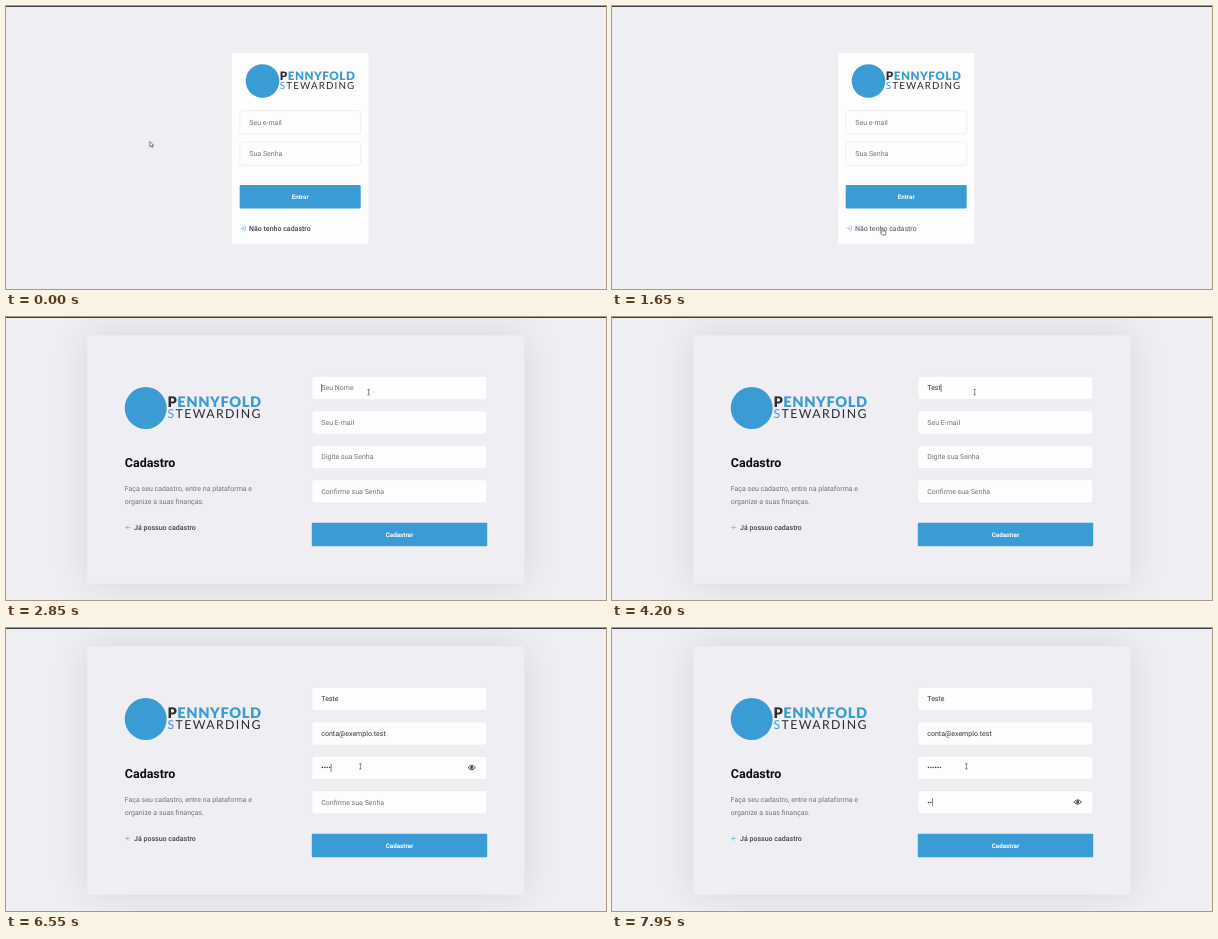
These frames come from a looping animation (600x283 px, 8000 ms). An HTML page:

```html
<!DOCTYPE html>
<html lang="pt-BR">
<head>
<meta charset="utf-8">
<title>Cadastro</title>
<style>
  html, body { margin: 0; width: 100%; height: 100%; overflow: hidden; background: #efeef3; }
  svg { display: block; width: 100vw; height: 100vh; }
  text { font: 400 7.02px Roboto, sans-serif; fill: #333; text-rendering: geometricPrecision; white-space: pre; }
  .hint { fill: #757575; }
  .note { fill: #737380; }
  .link { font-weight: 500; fill: #41414d; }
  .title { font-size: 12.48px; font-weight: 700; fill: #0c0c10; }
  .label { font-size: 6.25px; font-weight: 700; fill: #fff; text-anchor: middle; }
  .top { font: 900 14.6px Lato, sans-serif; letter-spacing: .6px; }
  .sub { font: 400 12.3px Lato, sans-serif; letter-spacing: 1.4px; }
  .blue { fill: #3a9bd5; }
  .dark { fill: #2b2b30; }
  .field { fill: #fdfdfe; stroke: #e0e0e8; stroke-width: .5; }
  .icon { fill: none; stroke: #3a9bd5; stroke-width: 2; stroke-linecap: round; stroke-linejoin: round; }
  .shadow { fill: #000; opacity: .1; filter: blur(19.5px); }
  .pointer { fill: #fff; stroke: #333; stroke-width: .6; stroke-linejoin: round; }
</style>
</head>
<body>
<svg viewBox="0 0 600 283" preserveAspectRatio="none">
  <defs>
    <g id="logo">
      <circle r="21" class="blue"/>
      <text x="21.7" y="-.8" class="top blue"><tspan class="dark">P</tspan>ENNYFOLD</text>
      <text x="21.7" y="9.8" class="sub dark"><tspan class="blue">S</tspan>TEWARDING</text>
    </g>
  </defs>
  <rect width="600" height="283" fill="#efeef3"/>

  <g id="login">
    <rect x="226" y="47" width="136.5" height="191" fill="#fdfdfe"/>
    <use href="#logo" transform="translate(256.5 75) scale(.8)"/>
    <g id="loginFields"></g>
    <rect x="233.7" y="179" width="121" height="23.4" rx="1" class="blue"/>
    <text x="294.2" y="193" class="label">Entrar</text>
    <g id="signup">
      <path class="icon" transform="translate(233.9 219.2) scale(.26)"
        d="M15 3h4a2 2 0 0 1 2 2v14a2 2 0 0 1-2 2h-4M10 17l5-5-5-5M15 12H3"/>
      <text x="243" y="224.7" class="link">Não tenho cadastro</text>
    </g>
  </g>

  <g id="register">
    <rect x="81.3" y="18.3" width="437.2" height="248.5" rx="3.1" class="shadow"/>
    <rect x="81.3" y="18.3" width="437.2" height="248.5" rx="3.1" fill="#efeef3"/>
    <use href="#logo" transform="translate(139.7 91)"/>
    <text x="118.8" y="150" class="title">Cadastro</text>
    <text x="118.8" y="174" class="note">Faça seu cadastro, entre na plataforma e</text>
    <text x="118.8" y="186.5" class="note">organize a suas finanças.</text>
    <path class="icon" transform="translate(118.8 207.4) scale(.26)" d="M19 12H5M12 19l-7-7 7-7"/>
    <text x="128" y="213" class="link">Já possuo cadastro</text>
    <g id="registerFields"></g>
    <rect x="305.8" y="205.8" width="175.4" height="23.4" rx="1" class="blue"/>
    <text x="393.5" y="219.7" class="label">Cadastrar</text>
    <g id="eye" fill="none" stroke="#333" stroke-width=".9">
      <path d="M-3.6 0Q0-4.4 3.6 0Q0 4.4-3.6 0Z"/>
      <circle r="1" fill="#333"/>
    </g>
    <rect id="caret" width=".6" height="8" fill="#333"/>
  </g>

  <rect width="600" height="1" fill="#3e3e44"/>

  <g id="mouse">
    <path id="arrow" class="pointer" d="M0 0V5.3L1.3 4.2L2.2 6.1L3.1 5.7L2.2 3.9H3.8Z"/>
    <path id="hand" class="pointer"
      d="M-.6 .6Q0-.3 .6 .6V2.8L3 3.3Q3.7 3.6 3.5 4.5L2.9 7H-.5L-2.2 4.5Q-2.2 3.5-1.4 3.8L-.6 4.5Z"/>
    <path id="beam" d="M-1.2-2.6H1.2M0-2.6V2.6M-1.2 2.6H1.2" fill="none" stroke="#444" stroke-width=".6"/>
  </g>
</svg>
<script>
const LOOP = 8000, TICK = 50;
const PAGE_AT = 1850;
const FIELD_H = 23.4;
const $ = id => document.getElementById(id);

// Pointer stops: time, x, y
const path = [
  [100, 143.8, 135.4], [700, 270.5, 222],
  [1900, 270.5, 222], [2450, 362.6, 75.2],
  [4950, 362.6, 75.2], [5200, 354.4, 138.4]
];

const every = (start, step, count) => Array.from({ length: count }, (_, i) => start + i * step);

const form = [
  { hint: 'Seu Nome', value: 'Teste', focus: 2500, keys: [3650, 3800, 3950, 4100, 4300] },
  { hint: 'Seu E-mail', value: 'conta@exemplo.test', focus: 4400, keys: every(4450, 25, 18) },
  { hint: 'Digite sua Senha', value: '••••••', secret: true, focus: 5200,
    keys: [5950, 6150, 6350, 6500, 6700, 6850] },
  { hint: 'Confirme sua Senha', value: '••', secret: true, focus: 7150, keys: [7600, 7800] }
];

function make(tag, parent, attrs) {
  const el = document.createElementNS('http://www.w3.org/2000/svg', tag);
  for (const k in attrs) el.setAttribute(k, attrs[k]);
  return parent.appendChild(el);
}

function addField(parent, x, y, width, hint) {
  make('rect', parent, { x, y, width, height: FIELD_H, rx: 3.1, class: 'field' });
  const text = make('text', parent, { x: x + 9.5, y: y + 14.1, class: 'hint' });
  text.textContent = hint;
  return text;
}

addField($('loginFields'), 233.8, 104.6, 120.9, 'Seu e-mail');
addField($('loginFields'), 233.8, 136, 120.9, 'Sua Senha');
form.forEach((f, i) => {
  f.y = 59.3 + i * 34.45;
  f.text = addField($('registerFields'), 305.8, f.y, 175.2, f.hint);
});

const show = (id, on) => $(id).setAttribute('visibility', on ? 'inherit' : 'hidden');
const move = (id, x, y) => $(id).setAttribute('transform', `translate(${x} ${y})`);
const clamp = v => Math.min(1, Math.max(0, v));
const inside = (p, x, y, w, h) => p.x >= x && p.x <= x + w && p.y >= y && p.y <= y + h;

function pointerAt(t) {
  let [, x, y] = path[0];
  for (let i = 1; i < path.length; i++) {
    const [t0, x0, y0] = path[i - 1], [t1, x1, y1] = path[i];
    if (t < t0) break;
    const u = clamp((t - t0) / (t1 - t0)), e = u * u * (3 - 2 * u);
    x = x0 + (x1 - x0) * e;
    y = y0 + (y1 - y0) * e;
  }
  return { x, y };
}

function drawPointer(t, onRegister) {
  const p = pointerAt(t);
  const hand = !onRegister && inside(p, 234, 217, 71, 11);
  const beam = onRegister
    ? form.some(f => inside(p, 305.8, f.y, 175.2, FIELD_H))
    : inside(p, 233.8, 104.6, 120.9, FIELD_H) || inside(p, 233.8, 136, 120.9, FIELD_H);
  move('mouse', p.x, p.y);
  show('hand', hand);
  show('beam', beam);
  show('arrow', !hand && !beam);
  $('signup').setAttribute('opacity', 1 - .25 * clamp((t - 600) / 200));
}

function drawForm(t) {
  let active = null;
  for (const f of form) {
    f.count = f.keys.filter(k => k <= t).length;
    f.text.textContent = f.count ? f.value.slice(0, f.count) : f.hint;
    f.text.setAttribute('class', f.count ? '' : 'hint');
    if (t >= f.focus) active = f;
  }
  show('eye', active && active.secret && active.count);
  show('caret', false);
  if (!active) return;
  move('eye', 465.7, active.y + 11.4);
  const last = active.count ? active.keys[active.count - 1] : active.focus;
  const width = active.count ? active.text.getComputedTextLength() : 0;
  move('caret', 315.3 + width, active.y + 7.6);
  show('caret', (t - last) % 1000 < 500);
}

function draw(t) {
  const onRegister = t >= PAGE_AT;
  show('login', !onRegister);
  show('register', onRegister);
  drawForm(t);
  drawPointer(t, onRegister);
}

const start = performance.now();
function loop() {
  const t = (performance.now() - start) % LOOP;
  draw(Math.floor(t / TICK) * TICK);
  requestAnimationFrame(loop);
}
loop();
</script>
</body>
</html>
```
